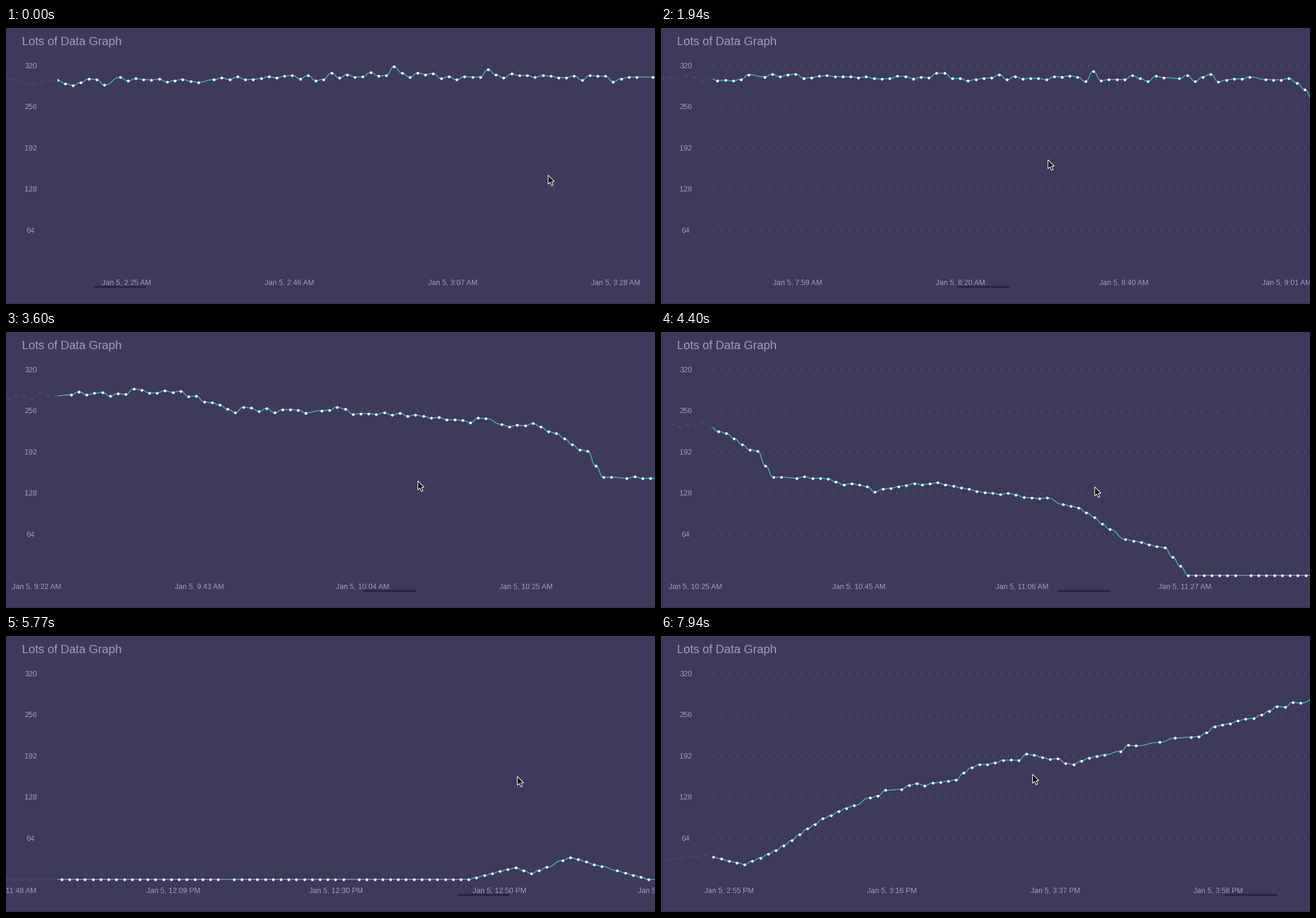
Animation, 1096 px wide and 466 px high, one loop 8000 ms. Source, as a matplotlib script:

```python
import numpy as np
import matplotlib.pyplot as plt
from matplotlib.animation import FuncAnimation
from matplotlib.patches import FancyBboxPatch, PathPatch, Polygon, Rectangle
from matplotlib.path import Path

W, H, DPI = 1096, 466, 100
LOOP, TICK = 8000, 20
BG, TEXT, TEAL, DARK = "#3d3a5b", "#a09dc0", "#41b9c1", "#28263a"
LEFT, TOP, ZERO = 87, 75, 411   # plot's left edge, usual ceiling, zero line
STEP = 13.2214                  # pixels per minute sample
LABEL_X, LABEL_STEP = 203.5, 275.5

# (sample, y) turning points of the trend
TREND = np.array([
    (0, 91), (20, 88), (45, 80), (57, 79), (70, 87), (330, 84), (404, 84),
    (407, 115), (420, 113), (430, 102), (442, 99), (449, 130), (462, 131),
    (489, 158), (495, 206), (497, 245), (503, 247), (510, 267), (517, 256),
    (532, 283), (536, 297), (542, 350), (547, 364), (550, 411), (629, 411),
    (635, 391), (637, 401), (642, 374), (652, 411), (708, 411), (711, 401),
    (715, 411), (727, 411), (755, 370), (760, 386), (764, 362), (770, 310),
    (778, 261), (787, 241), (789, 222), (797, 199), (802, 215), (809, 185),
    (816, 174), (822, 147), (832, 110)])
PEAKS = {42: 65, 54: 70, 379: 73}

# time, screen refresh, scroll offset, pointer x, pointer y
KEYS = np.array([
    (0, 0, 0, 915, 248), (1940, 33, 4381, 653, 222),
    (2850, 48, 5168, 669, 240), (4220, 72, 6165, 723, 259),
    (4400, 75, 6481.5, 732, 261), (5770, 99, 7635, 863, 236.5),
    (6910, 119, 8623.5, 659, 233), (7600, 131, 9800, 634, 233),
    (7940, 137, 10007, 627, 233)])


def smooth(x, xs, ys):
    """Monotone cubic interpolation."""
    h = np.diff(xs)
    d = np.diff(ys) / h
    m = np.concatenate([d[:1], np.zeros(len(d) - 1), d[-1:]])
    same = d[:-1] * d[1:] > 0
    m[1:-1][same] = 2 / (1 / d[:-1][same] + 1 / d[1:][same])
    i = np.clip(np.searchsorted(xs, x, "right") - 1, 0, len(h) - 1)
    u = (x - xs[i]) / h[i]
    return (ys[i] * (1 + 2 * u) * (1 - u) ** 2 + ys[i + 1] * u * u * (3 - 2 * u)
            + h[i] * u * (1 - u) * (m[i] * (1 - u) - m[i + 1] * u))


def make_series():
    """Trend with noise that fades towards zero, and some samples missing."""
    rng = np.random.default_rng(5)
    n = np.arange(-8, 840)
    y = np.interp(n, *TREND.T)
    noise = np.clip(rng.normal(size=n.size), -2, 2)
    y = np.clip(y + noise * (ZERO - y) / 85, TOP, ZERO)
    kept = rng.random(n.size) > 0.07
    for k, top in PEAKS.items():
        y[n == k] = top
        kept[n == k] = True
    return 100 + STEP * n[kept], y[kept]


def curve(x, y):
    """Path through the points, level at each of them."""
    mid = (x[:-1] + x[1:]) / 2
    legs = np.stack([np.column_stack(p) for p in
                     ((mid, y[:-1]), (mid, y[1:]), (x[1:], y[1:]))], axis=1)
    verts = np.vstack([[x[0], y[0]], legs.reshape(-1, 2)])
    return Path(verts, [Path.MOVETO] + [Path.CURVE4] * (len(verts) - 1))


def clock(k):
    minute = int(145.85 + k * 125 / 6)
    hour = minute // 60
    return f"Jan 5, {(hour - 1) % 12 + 1}:{minute % 60:02d} {'AM' if hour < 12 else 'PM'}"


def px(size):
    return size * 72 / DPI


plt.rcParams["font.family"] = "Liberation Sans"
fig = plt.figure(figsize=(W / DPI, H / DPI), dpi=DPI, facecolor=BG)
ax = fig.add_axes([0, 0, 1, 1])
ax.set(xlim=(0, W), ylim=(H, 0))
ax.axis("off")


def write(x, y, text, size, ha="center"):
    return ax.text(x, y, text, fontsize=px(size), color=TEXT, ha=ha,
                   va="baseline", zorder=6)


write(26.7, 29, "Lots of Data Graph", 19.9, "left")
rows = ZERO - 69.55 * np.arange(1, 6)
for i, row in enumerate(rows):
    write(41.7, row + 4.5, str(64 * (i + 1)), 12.7)
gx, gy = np.meshgrid(LEFT + 0.5 + 13.5 * np.arange(75), rows)
ax.plot(gx.ravel(), gy.ravel(), "s", ms=px(1.4), mew=0, color="#75729a", zorder=1)
ax.add_patch(Rectangle((0, 464), W, 2, color="#39324f", lw=0))

line = ax.add_patch(PathPatch(Path([(0, 0), (1, 1)]), fill=False, ec=TEAL,
                              lw=px(1.5), zorder=2))
dots, = ax.plot([], [], "o", ms=px(4.6), mew=0, color="white", zorder=3)
dots.set_snap(False)
ax.add_patch(Rectangle((0, 40), LEFT, 380, color=BG, alpha=0.94, lw=0, zorder=4))

labels = [write(0, 433.2, "", 12.55) for _ in range(5)]
bar = ax.add_patch(FancyBboxPatch((148, 435.5), 88.5, 3.4, fc=DARK, lw=0, zorder=7,
                                  boxstyle="round,pad=0,rounding_size=1.7"))
ARROW = np.array([(0.5, 0.5), (0.5, 15.6), (4, 12.4), (6.4, 18.2), (9, 17.1),
                  (6.6, 11.5), (11, 11.2)])
arrow = ax.add_patch(Polygon(ARROW, fc="black", ec="white", lw=px(1.1), zorder=8))

SX, SY = make_series()
key_t, key_step, scroll, tip_x, tip_y = KEYS.T
times = np.interp(np.arange(key_step[-1] + 1), key_step, key_t)
starts = np.floor(times / TICK + 1e-6) * TICK


def draw(i):
    t = times[np.searchsorted(starts, i * TICK, "right") - 1]
    s = smooth(t, key_t, scroll)

    a, b = np.searchsorted(SX, [s - 60, s + W + 60])
    x, y = SX[a:b] - s, SY[a:b]
    line.set_path(curve(x, y))
    dots.set_data(x, y)

    first = int(np.ceil((s - LABEL_X - 50) / LABEL_STEP))
    for k, label in enumerate(labels, first):
        label.set_text(clock(k))
        label.set_x(LABEL_X + k * LABEL_STEP - s)

    bar.set_x(148 + 0.0804 * s)
    arrow.set_xy(ARROW + (smooth(t, key_t, tip_x), smooth(t, key_t, tip_y)))
    return [line, dots, bar, arrow, *labels]


anim = FuncAnimation(fig, draw, frames=LOOP // TICK, interval=TICK,
                     repeat=True, repeat_delay=0, blit=False)
plt.show()
```
